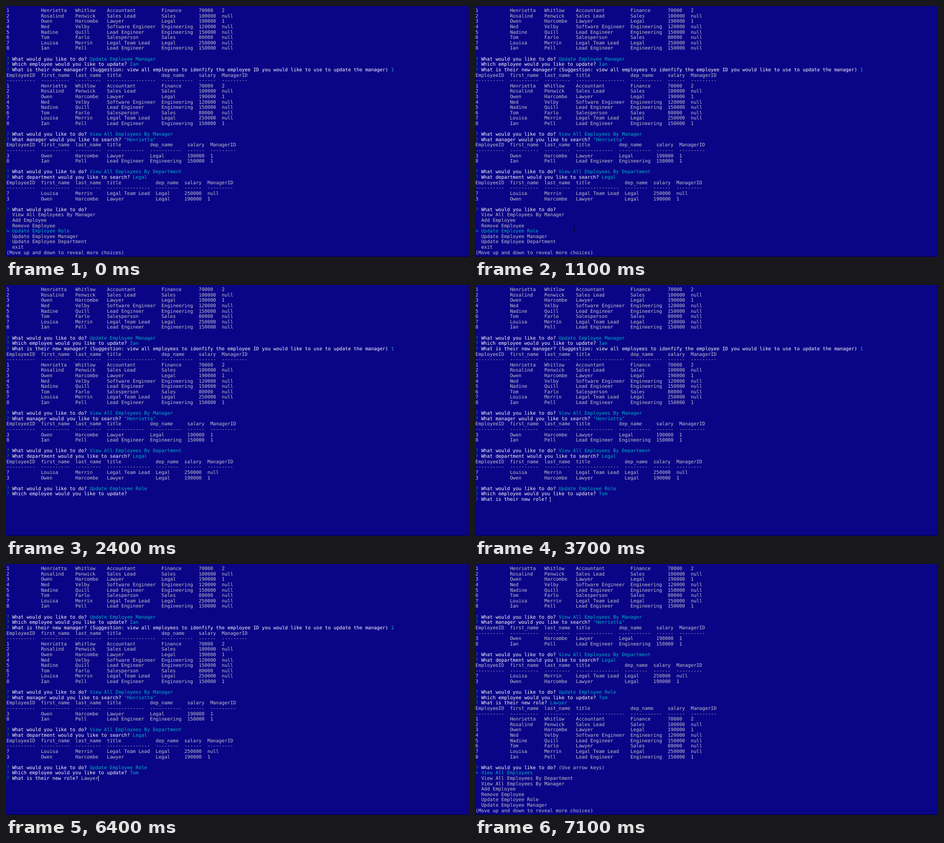
An HTML page that plays this animation: 1000 px wide and 542 px high, repeating every 7.2 s.

```html
<!DOCTYPE html>
<html lang="en">
<head>
<meta charset="utf-8">
<title>Employee tracker terminal</title>
<style>
  html, body { margin: 0; width: 100%; height: 100%; overflow: hidden; background: #0a0587; }
  #screen {
    position: absolute; left: 1px; top: 5.2px; margin: 0;
    font: 10.3px/11.61px "DejaVu Sans Mono", monospace;
    text-rendering: geometricPrecision;
    font-variant-ligatures: none;
    color: #c4c4cc;
  }
  b { font-weight: normal; color: #fff; }
  .mark { color: #00a030; }
  .pick { color: #00b2c8; }
  .caret { border-left: 1px solid #e0e0e0; margin-right: -1px; }
  #edge { position: absolute; inset: 0; border-right: 1px solid #03012c; border-bottom: 2px solid #07035c; }
  #mouse { position: absolute; left: -3px; top: -6px; stroke: #000; fill: none; }
</style>
</head>
<body>
<pre id="screen"></pre>
<div id="edge"></div>
<svg id="mouse" width="7" height="13"><path d="M1 .5H6M3.5 .5V12.5M1 12.5H6"/></svg>
<script>
const LOOP = 7200;
const screenEl = document.getElementById('screen');
const mouseEl = document.getElementById('mouse');

const HEADER = ['EmployeeID', 'first_name', 'last_name', 'title', 'dep_name', 'salary', 'ManagerID'];
const STAFF = [
  '1,Henrietta,Whitlow,Accountant,Finance,70000,2',
  '2,Rosalind,Penwick,Sales Lead,Sales,100000,null',
  '3,Owen,Harcombe,Lawyer,Legal,190000,1',
  '4,Ned,Velby,Software Engineer,Engineering,120000,null',
  '5,Nadine,Quill,Lead Engineer,Engineering,150000,null',
  '6,Tom,Farlo,Salesperson,Sales,80000,null',
  '7,Louisa,Merrin,Legal Team Lead,Legal,250000,null',
  '8,Ian,Pell,Lead Engineer,Engineering,150000,null'
].map(row => row.split(','));

const withValue = (staff, id, column, value) =>
  staff.map(row => row[0] == id ? row.with(column, value) : row);
const managed = withValue(STAFF, 8, 6, '1');
const promoted = withValue(managed, 6, 3, 'Lawyer');
const byId = (...ids) => ids.map(id => managed[id - 1]);

function table(rows) {
  const widths = HEADER.map((name, i) => Math.max(name.length, ...rows.map(row => row[i].length)));
  const line = cells => cells.map((cell, i) => cell.padEnd(widths[i])).join('  ');
  return [line(HEADER), line(widths.map(w => '-'.repeat(w))), ...rows.map(line), ''];
}

const pick = text => `<span class="pick">${text}</span>`;
const ask = (question, rest = '') => `<span class="mark">?</span> <b>${question}</b> ${rest}`;
const answer = (question, reply) => ask(question, pick(reply));
const menu = (items, selected) => [
  ...items.map((item, i) => i === selected ? pick('&gt; ' + item) : '  ' + item),
  '(Move up and down to reveal more choices)'
];

const TODO = 'What would you like to do?';
const WHO = 'Which employee would you like to update?';
const ROLE = 'What is their new role?';
const BY_MANAGER = 'View All Employees By Manager';
const BY_DEPARTMENT = 'View All Employees By Department';

const history = [
  ...table(STAFF).slice(2),
  answer(TODO, 'Update Employee Manager'),
  answer(WHO, 'Ian'),
  answer('What is their new manager? (Suggestion: view all employees to idenfify the employee ID you would like to use to update the manager)', '1'),
  ...table(managed),
  answer(TODO, BY_MANAGER),
  answer('What manager would you like to search?', '"Henrietta"'),
  ...table(byId(3, 8)),
  answer(TODO, BY_DEPARTMENT),
  answer('What department would you like to search?', 'Legal'),
  ...table(byId(7, 3))
];
const EDITS = ['Add Employee', 'Remove Employee', 'Update Employee Role', 'Update Employee Manager'];
const firstMenu = [ask(TODO), ...menu([BY_MANAGER, ...EDITS, 'Update Employee Department', 'exit'], 3)];
const lastMenu = [ask(TODO, '(Use arrow keys)'),
  ...menu(['View All Employees', BY_DEPARTMENT, BY_MANAGER, ...EDITS], 0)];
const chosen = answer(TODO, 'Update Employee Role');

// Each key time reveals one more character.
const typed = (text, times, t) => text.slice(0, times.filter(time => t >= time).length);
const caretShown = t => t >= 2700 && !(t >= 4000 && t < 4500);

function lines(t) {
  if (t < 2000) return [...history, ...firstMenu];
  const caret = caretShown(t) ? '<span class="caret"></span>' : '';
  if (t < 3200) return [...history, chosen, ask(WHO, typed('Tom', [2800, 3000, 3000], t) + caret)];
  const updated = [...history, chosen, answer(WHO, 'Tom')];
  if (t < 6700) {
    return [...updated, ask(ROLE, typed('Lawyer', [4600, 4800, 5200, 5500, 5800, 6100], t) + caret)];
  }
  return [...updated, answer(ROLE, 'Lawyer'), ...table(promoted), ...lastMenu].slice(-46);
}

function moveMouse(t) {
  const visible = t >= 400 && t < 1800;
  mouseEl.style.display = visible ? 'block' : 'none';
  if (!visible) return;
  const away = t < 1100 ? ((1100 - t) / 700) ** 2 : Math.max(0, (t - 1200) / 600) ** 2;
  const [dx, dy] = t < 1100 ? [790, -180] : [90, 66];
  mouseEl.style.transform = `translate(${Math.round(214 + dx * away)}px, ${Math.round(482 + dy * away)}px)`;
}

let shown;
function draw(now) {
  const t = now % LOOP;
  const html = lines(t).join('\n');
  if (html !== shown) screenEl.innerHTML = shown = html;
  moveMouse(t);
  requestAnimationFrame(draw);
}
draw(0);
</script>
</body>
</html>
```
